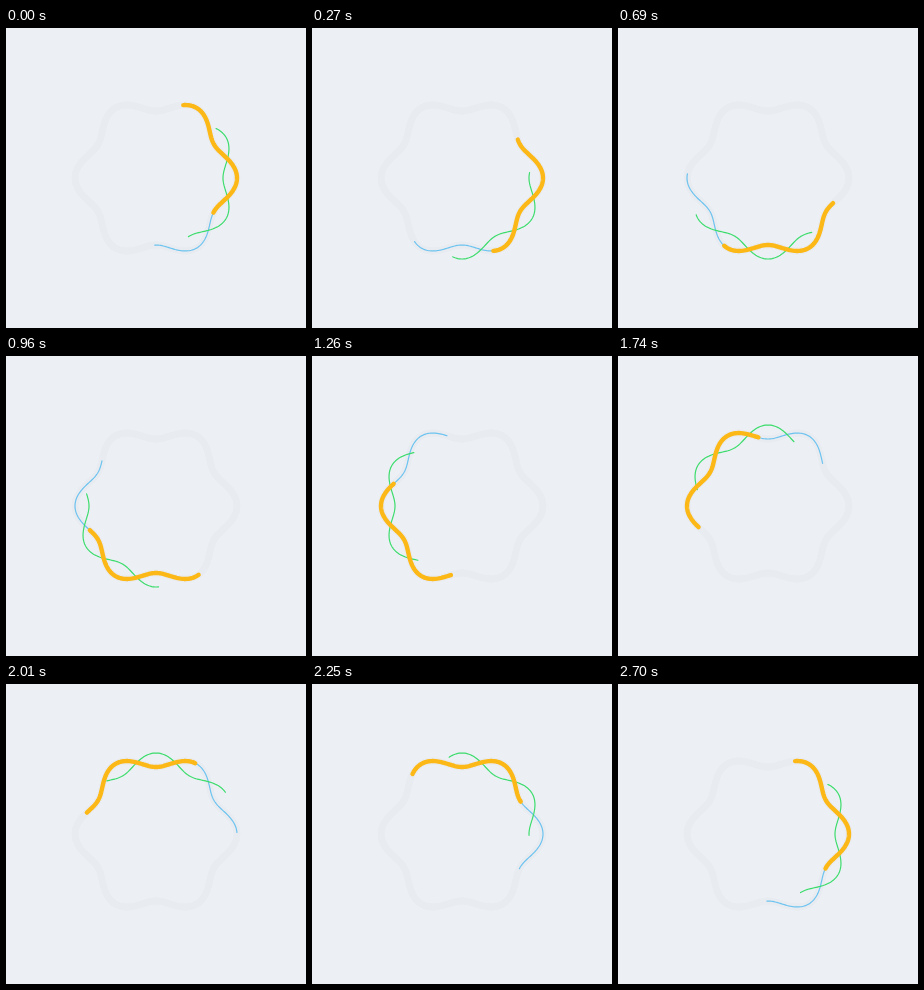
Animation of 300 by 300 pixels, one loop 2.73 s. Source, as an HTML page:

```html
<!DOCTYPE html>
<html lang="en">
<head>
<meta charset="utf-8">
<title>Loader</title>
<style>
  html, body { margin: 0; width: 100%; height: 100%; overflow: hidden; background: #ecf0f5; }
  svg { display: block; width: 100%; height: 100%; }
  use { fill: none; stroke-linecap: round; stroke-linejoin: round; }
  .track { stroke: #e8ebf0; stroke-width: 7; }
  .dash {
    stroke-dasharray: 100.8 259.2;
    animation: run 2730ms linear infinite;
  }
  .blue { stroke: #6cc3f0; stroke-width: 1.2; }
  .green { stroke: #3ddc6c; stroke-width: 1.2; }
  .gold { stroke: #fcb816; stroke-width: 4.4; }
  /* One full lap in 2700 ms, then a 30 ms hold */
  @keyframes run {
    0% { stroke-dashoffset: 70; }
    98.9011%, 100% { stroke-dashoffset: -290; }
  }
</style>
</head>
<body>
<svg viewBox="-150 -150 300 300">
  <defs><path id="wave" pathLength="360"/></defs>
  <use href="#wave" class="track"/>
  <use href="#wave" class="dash blue" transform="rotate(60)"/>
  <use href="#wave" class="dash green" transform="rotate(30)"/>
  <use href="#wave" class="dash gold"/>
</svg>
<script>
  // Six-lobed ring: r = 74 + 7 cos 6a
  const points = Array.from({ length: 360 }, (_, i) => {
    const a = i * Math.PI / 180;
    const r = 74 + 7 * Math.cos(6 * a);
    return `${(r * Math.cos(a)).toFixed(3)} ${(r * Math.sin(a)).toFixed(3)}`;
  });
  document.getElementById('wave').setAttribute('d', `M${points.join('L')}Z`);
</script>
</body>
</html>
```
